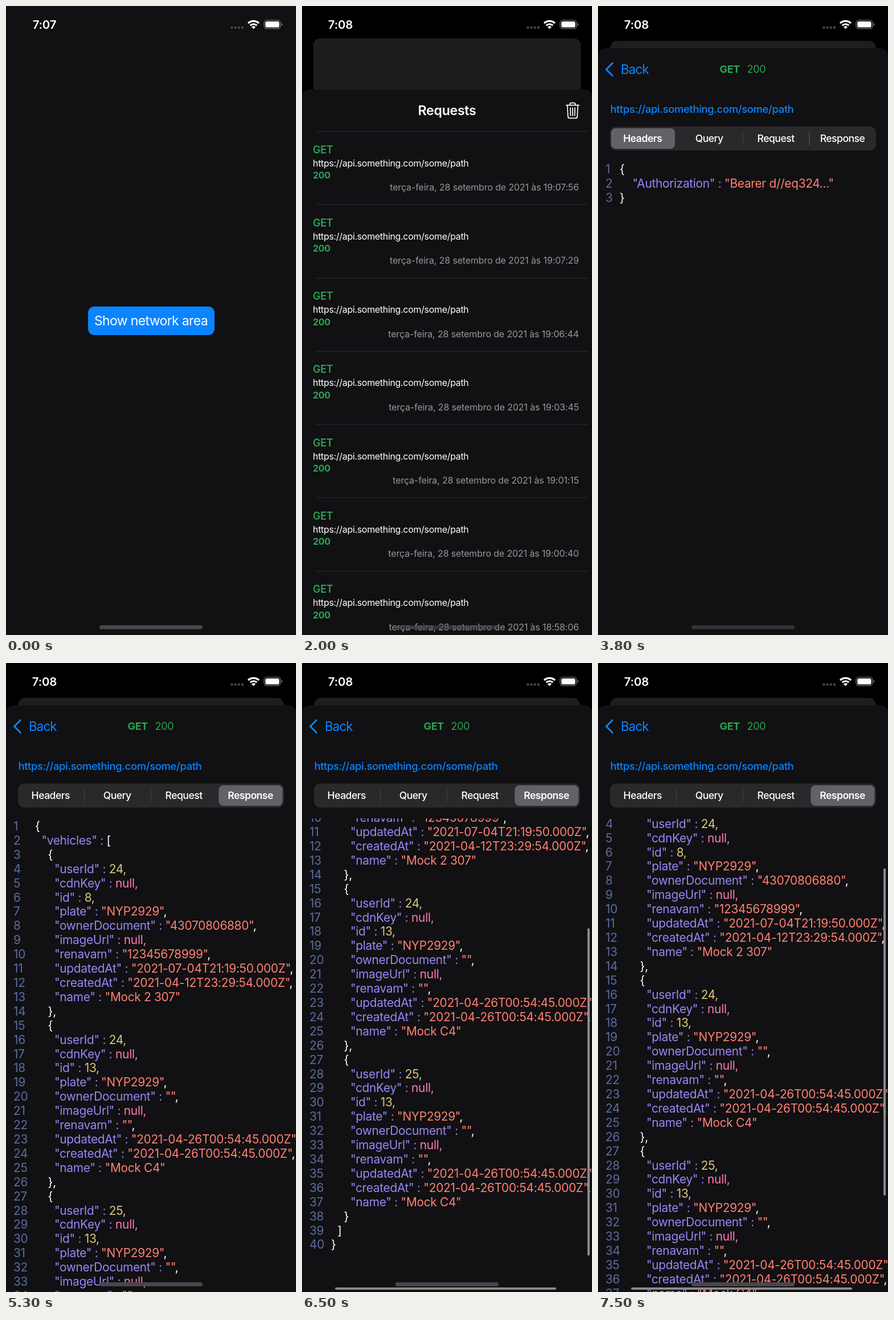
Write an HTML page that moves like this. It is 509 px wide and 1101 px high and loops after 7.6 s.

```html
<!DOCTYPE html>
<html lang="en">
<head>
<meta charset="utf-8">
<title>Network area</title>
<style>
@property --open { syntax: "<number>"; inherits: true; initial-value: 0; }
@property --push { syntax: "<number>"; inherits: true; initial-value: 0; }
@property --tab { syntax: "<number>"; inherits: true; initial-value: 0; }
@property --scroll { syntax: "<number>"; inherits: true; initial-value: 0; }

html, body { margin: 0; width: 100%; height: 100%; overflow: hidden; background: #000; }
#stage {
  --blue: #0a84ff; --green: #27a652; --page: #111013;
  position: relative; width: 509px; height: 1101px; overflow: hidden;
  font: 400 16px Inter, "Open Sans", sans-serif; letter-spacing: -.02em; color: #fff;
  animation: open 7.6s infinite, push 7.6s infinite, tab 7.6s infinite, scroll 7.6s infinite;
}
#stage div, #stage svg { position: absolute; }
/* Zero line height centres capitals on the given top. */
.t { line-height: 0; white-space: pre; }
.mid { transform: translateX(-50%); }
.green { color: var(--green); }
.fill { inset: 0; }

/* Motion advances ten times a second. */
@keyframes open {
  0% { --open: 0; }
  21.05% { --open: 0; animation-timing-function: linear(0 0% 16.6%, .1 16.6% 33.3%, .5 33.3% 50%, .8 50% 66.6%, .93 66.6% 83.3%, .985 83.3% 100%, 1 100%); }
  28.94%, 100% { --open: 1; }
}
@keyframes push {
  0% { --push: 0; }
  34.21% { --push: 0; animation-timing-function: linear(0 0% 20%, .12 20% 40%, .6 40% 60%, .86 60% 80%, .96 80% 100%, 1 100%); }
  40.78%, 100% { --push: 1; }
}
@keyframes tab {
  0% { --tab: 0; }
  50% { --tab: 0; animation-timing-function: linear(0 0% 33.3%, .4 33.3% 66.6%, .85 66.6% 100%, 1 100%); }
  53.94% { --tab: 1; }
  56.57% { --tab: 1; animation-timing-function: linear(0 0% 33.3%, .4 33.3% 66.6%, .85 66.6% 100%, 1 100%); }
  60.52% { --tab: 2; }
  63.15% { --tab: 2; animation-timing-function: linear(0 0% 33.3%, .4 33.3% 66.6%, .85 66.6% 100%, 1 100%); }
  67.1%, 100% { --tab: 3; }
}
@keyframes scroll {
  0% { --scroll: 0; }
  75% { --scroll: 0; animation-timing-function: linear(.03 0% 12.5%, .2 12.5% 25%, .5 25% 37.5%, .74 37.5% 50%, .88 50% 62.5%, .95 62.5% 75%, .98 75% 87.5%, .995 87.5% 100%, 1 100%); }
  85.52% { --scroll: 1; }
  86.84% { --scroll: 1; animation-timing-function: linear(0 0% 11.1%, .02 11.1% 22.2%, .08 22.2% 33.3%, .2 33.3% 44.4%, .38 44.4% 55.5%, .58 55.5% 66.6%, .76 66.6% 77.7%, .89 77.7% 88.8%, .97 88.8% 100%, 1 100%); }
  98.68%, 100% { --scroll: .3326; }
}
@keyframes before { 0% { opacity: 1; } 21.05%, 100% { opacity: 0; } }
@keyframes after { 0% { opacity: 0; } 21.05%, 100% { opacity: 1; } }

.clock { left: 67.5px; top: 32.5px; font-size: 20.4px; letter-spacing: -.01em; font-weight: 600; animation: before 7.6s step-end infinite; }
.clock.late { animation-name: after; }
/* The indicator dims over the sheet until the response fills it. */
#home {
  left: 164px; top: 1084px; width: 181px; height: 6.5px; border-radius: 4px; background: #48474b;
  opacity: calc(1 - .4 * var(--open) + .4 * max(0, var(--tab) - 2));
}

#back {
  inset: 0; transform-origin: top; border-radius: calc(14px * var(--open));
  background: rgb(calc(17 + 13 * var(--open)), calc(16 + 13 * var(--open)), calc(19 + 13 * var(--open)));
  transform: translateY(calc(61px * var(--open))) scale(calc(1 - .083 * var(--open)));
}
#button { left: 143.5px; top: 526px; width: 222px; height: 49.5px; border-radius: 11px; background: var(--blue); }
#button .t { left: 50%; top: 50%; font-size: 23px; letter-spacing: -.028em; }

#sheet {
  left: 0; top: 74px; width: 509px; height: 1027px; overflow: hidden;
  border-radius: 14px 14px 0 0; background: var(--page);
  transform: translateY(calc(1027px * (1 - var(--open))));
}
/* Inside the sheet, positions still count from the top of the stage. */
#space { left: 0; top: -74px; width: 509px; height: 1101px; }
#list { inset: 0; transform: translateX(calc(-30% * var(--push))); }
.row { left: 0; width: 509px; height: 128px; }
.rule { left: 24px; width: 479px; height: 1px; background: #2b2a2e; }
.method { left: 19px; top: 32.5px; font-size: 18px; font-weight: 600; }
.url { left: 19px; top: 55.5px; }
.status { left: 19px; top: 77px; font-weight: 700; }
.date { right: 23px; top: 98px; color: #98979b; letter-spacing: -.009em; }

#listbar { inset: 0; opacity: calc(1 - var(--push)); }
#listbar .t { left: 254.5px; top: 111px; font-size: 23.2px; font-weight: 600; transform: translateX(calc(-50% - 180px * var(--push))); }
#detailbar { inset: 0; opacity: var(--push); font-size: 18px; }
#backlabel { left: 40px; top: 111px; font-size: 22.4px; letter-spacing: -.04em; color: var(--blue); transform: translateX(calc(160px * (1 - var(--push)))); }
#call { inset: 0; color: var(--green); transform: translateX(calc(200px * (1 - var(--push)))); }

#detail { left: 0; top: 0; width: 509px; height: 1101px; clip-path: inset(147px 0 0); background: var(--page); transform: translateX(calc(100% * (1 - var(--push)))); }
#link { left: 21.5px; top: 179.5px; font-size: 18.4px; font-weight: 500; color: var(--blue); }
#segments { left: 21px; top: 211px; width: 467px; height: 42px; border-radius: 11px; background: #29282b; }
#thumb { left: 2px; top: 3px; width: 111.5px; height: 36px; border-radius: 8px; background: #636167; transform: translateX(calc(116.8px * var(--tab))); }
.label {
  --far: max(var(--tab) - var(--i), var(--i) - var(--tab));
  left: calc(57.3px + 116.9px * var(--i)); top: 21px; font-size: 17.6px; letter-spacing: -.03em;
  font-weight: calc(500 + 100 * max(0, 1 - var(--far)));
}
.divider {
  --edge: calc(var(--i) - .5);
  left: calc(-1px + 116.8px * var(--i)); top: 9px; width: 1.3px; height: 24px; background: #414045;
  opacity: calc((max(var(--tab) - var(--edge), var(--edge) - var(--tab)) - .6) * 10);
}
#body { left: 0; top: 272px; width: 509px; height: 829px; overflow: hidden; font-size: 20.9px; }
#headers { opacity: calc((.3 - var(--tab)) * 1000); }
#response { opacity: calc((var(--tab) - 2.3) * 1000); transform: translateY(calc(-239px * var(--scroll))); }
.number { left: 13px; color: #5b6ca0; }
.key { color: #9787f5; }
.string { color: #ff8170; }
.value { color: #d9c97c; }
.null { color: #ff7ab2; }
.bar { border-radius: 3px; background: #8b8a8d; opacity: calc(var(--scroll) * 20); }
#vbar { left: 501px; top: 306.7px; width: 4px; height: 573px; transform: translateY(calc(157.3px * var(--scroll))); }
#hbar { left: 58px; top: 1093px; width: 388px; height: 4px; }
</style>
</head>
<body>
<div id="stage">
  <div id="back"><div id="button"><div class="t mid">Show network area</div></div></div>

  <div id="sheet"><div id="space">
    <div id="list"></div>
    <div id="detail">
      <div id="link" class="t">https://api.something.com/some/path</div>
      <div id="segments"><div id="thumb"></div></div>
      <div id="body"><div id="headers" class="fill"></div><div id="response" class="fill"></div></div>
      <div id="vbar" class="bar"></div>
      <div id="hbar" class="bar"></div>
    </div>
    <div id="listbar">
      <div class="t">Requests</div>
      <svg style="left:462px;top:96px" width="26" height="30" fill="none" stroke="#fff" stroke-width="1.7" stroke-linecap="round" stroke-linejoin="round">
        <path d="M1.8 5.8H24.2M8.4 5.8V3.5Q8.4 1.7 10.2 1.7H15.8Q17.6 1.7 17.6 3.5V5.8M3.8 5.8L4.8 25.8Q5 28.400 7.600 28.400H18.400Q21 28.400 21.200 25.800L22.200 5.800M9 10.300L9.400 24M13 10.300V24M17 10.300L16.600 24"/>
      </svg>
    </div>
    <div id="detailbar">
      <svg style="left:11px;top:97px" width="18" height="28" fill="none" stroke="#0a84ff" stroke-width="3" stroke-linecap="round" stroke-linejoin="round"><path d="M14.5 3L3.5 14L14.5 25"/></svg>
      <div id="backlabel" class="t">Back</div>
      <div id="call">
        <div class="t" style="left:213.5px;top:111px;font-weight:700">GET</div>
        <div class="t" style="left:261.5px;top:111px">200</div>
      </div>
    </div>
  </div></div>

  <div class="t mid clock">7:07</div>
  <div class="t mid clock late">7:08</div>
  <svg style="left:390px;top:20px" width="100" height="26" fill="none">
    <g fill="#48474b"><circle cx="6.5" cy="17.7" r="2.2"/><circle cx="12.7" cy="17.7" r="2.2"/><circle cx="18.8" cy="17.7" r="2.2"/><circle cx="25" cy="17.7" r="2.2"/></g>
    <g stroke="#fff" stroke-width="3.1"><path d="M35 10.2A13.8 13.8 0 0 1 54 10.2M38.7 14A8.5 8.5 0 0 1 50.3 14"/></g>
    <path d="M44.5 20.2L41 16.7A5 5 0 0 1 48 16.7Z" fill="#fff"/>
    <rect x="63.1" y="4.8" width="28.6" height="14.8" rx="4.5" stroke="#737276" stroke-width="1.3"/>
    <rect x="65.2" y="6.9" width="24.4" height="10.6" rx="2.8" fill="#fff"/>
    <path d="M93.3 9.8Q95.2 10.5 95.2 12.2T93.3 14.6Z" fill="#737276"/>
  </svg>
  <div id="home"></div>
</div>
<script>
const find = id => document.getElementById(id);
const add = (id, html) => find(id).insertAdjacentHTML("beforeend", html);

const times = ["19:07:56", "19:07:29", "19:06:44", "19:03:45", "19:01:15", "19:00:40", "18:58:06", "18:57:31"];
add("list", times.map((time, i) => `<div class="row" style="top:${147.2 + 128.25 * i}px">
  <div class="rule"></div>
  <div class="t method green">GET</div>
  <div class="t url">https://api.something.com/some/path</div>
  <div class="t status green">200</div>
  <div class="t date">terça-feira, 28 setembro de 2021 às ${time}</div></div>`).join(""));

add("segments", ["Headers", "Query", "Request", "Response"].map((name, i) =>
  (i ? `<div class="divider" style="--i:${i}"></div>` : "") +
  `<div class="t mid label" style="--i:${i}">${name}</div>`).join(""));

const span = (kind, text) => `<span class="${kind}">${text}</span>`;

function paint(line) {
  const [, key, rest] = line.match(/^("\w+": )?(.*)$/);
  const head = key ? span("key", key.replace(":", " :")) : "";
  if (rest[0] === '"') return head + rest.replace(/".*"/, text => span("string", text));
  if (rest.startsWith("null")) return head + span("null", rest);
  return head + (/^\d/.test(rest) ? span("value", rest) : rest);
}

function showJson(id, data, left, indent) {
  const lines = JSON.stringify(data, null, indent).split("\n");
  add(id, lines.map((line, i) => {
    const text = line.trimStart();
    const x = left + (line.length - text.length) * 5.65;
    const top = 14 + 24.91 * i;
    return `<div class="t number" style="top:${top}px">${i + 1}</div>` +
      `<div class="t" style="left:${x}px;top:${top}px">${paint(text)}</div>`;
  }).join(""));
}

const vehicle = (userId, id, ownerDocument, renavam, updatedAt, createdAt, name) => ({
  userId, cdnKey: null, id, plate: "NYP2929", ownerDocument, imageUrl: null, renavam, updatedAt, createdAt, name
});
const april = "2021-04-26T00:54:45.000Z";

showJson("headers", { Authorization: "Bearer d//eq324..." }, 38, 4);
showJson("response", { vehicles: [
  vehicle(24, 8, "43070806880", "12345678999", "2021-07-04T21:19:50.000Z", "2021-04-12T23:29:54.000Z", "Mock 2 307"),
  vehicle(24, 13, "", "", april, april, "Mock C4"),
  vehicle(25, 13, "", "", april, april, "Mock C4")
] }, 51, 2);
</script>
</body>
</html>
```
